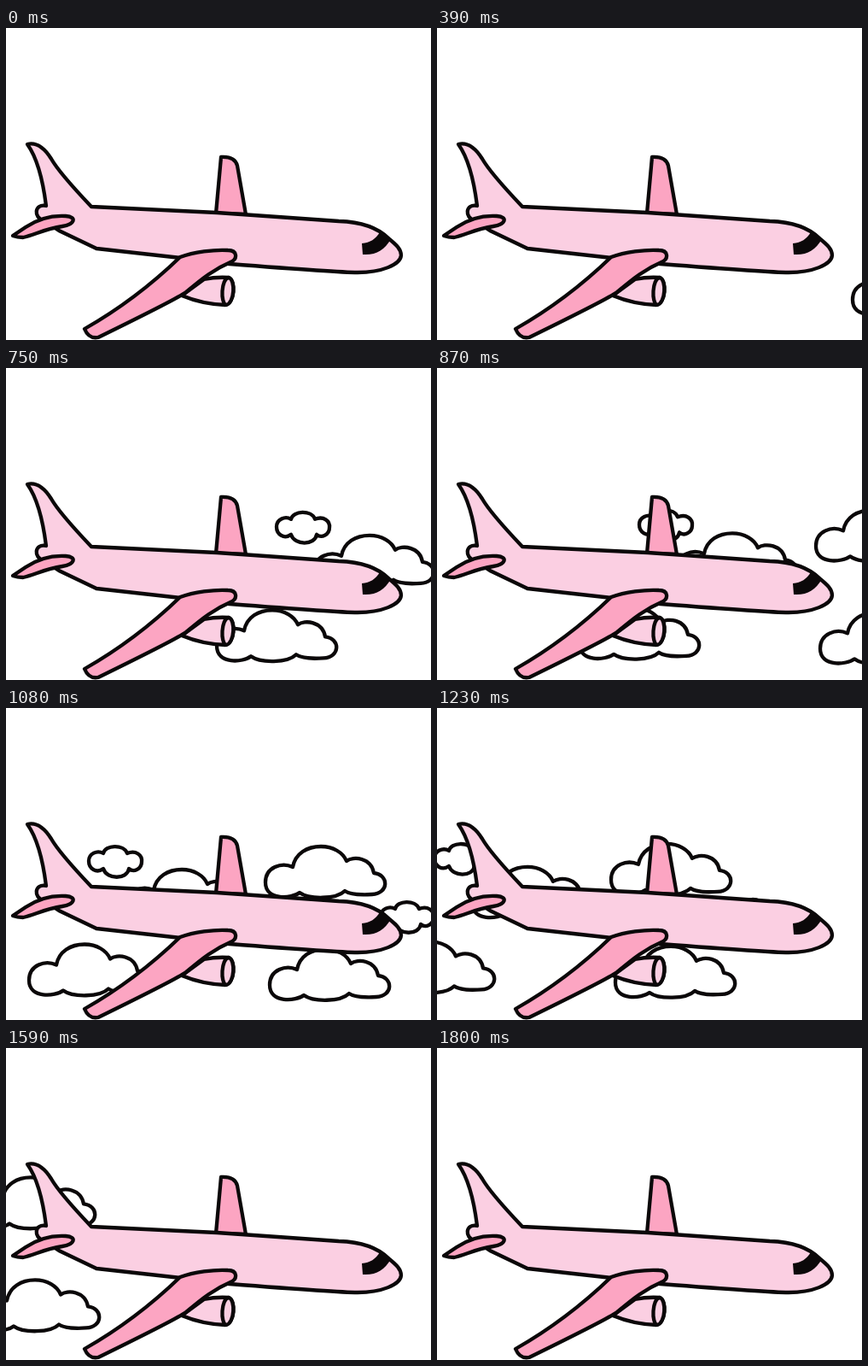
Recreate the animation shown at these times as an HTML page with a canvas. Size 498x365 px, loop 1830 ms.

```html
<!DOCTYPE html>
<html lang="en">
<head>
<meta charset="utf-8">
<title>Pink plane</title>
<style>
  html, body { margin: 0; width: 100%; height: 100%; overflow: hidden; background: #fff; }
  canvas { display: block; }
</style>
</head>
<body>
<canvas id="stage" width="498" height="365"></canvas>
<script>
const ctx = document.getElementById('stage').getContext('2d');
const LOOP = 1830, STEP = 30, LAST = 60;
const SPEED = 20, REST = 36, DRIFT = 0.62, TURN = 25;
const INK = '#0b0809', PALE = '#fbcfe2', ROSE = '#fca5c2', WHITE = '#fff';

const bigCloud = new Path2D('M33 26C36 10 50 2 66 2C80 2 92 9 96 19C104 13 125 15 128 33C146 35 146 57 126 58C114 59 100 58 94 54C84 64 52 64 41 56C32 63 1 66 1 44C1 26 20 20 33 26Z');
const smallCloud = new Path2D('M18 10C20 0 42-1 46 10C56 6 64 12 63 20C63 28 54 33 48 28C46 41 22 41 18 28C10 34 1 28 1 19C1 10 11 6 18 10Z');

// x and y hold where each cloud is at step REST.
const clouds = [
  { shape: smallCloud, x: 96, y: 160 },
  { shape: bigCloud, x: 140, y: 187 },
  { shape: bigCloud, x: 26, y: 274.5 },
  { shape: bigCloud, x: 303, y: 160 },
  { shape: bigCloud, x: 308, y: 280 },
  { shape: smallCloud, x: 438, y: 225 }
];

const plane = [
  // far wing, engine, engine mouth
  ['M252 151Q268 150 271 161L281 218L246 217Z', ROSE],
  ['M206 313L232 294Q246 291 261 292C270 296 268 322 257 324Q230 323 206 313Z', PALE],
  ['M261 292C269 294 268 322 258 324C251 322 252 293 261 292Z', PALE],
  // fuselage with fin and tail bump
  ['M25 136C37 133 46 142 53 153Q62 169 100 209L247 216L390 226C420 227 437 235 448 246C458 254 463 259 463 266C462 277 440 286 412 286Q390 286 262 276L205 269L106 258L62 237L44 225C32 222 33 205 47 208C44 184 38 154 25 136Z', PALE],
  // stabilizer, near wing
  ['M8 243L23 233C38 223 54 219 70 220C84 221 80 230 66 232C45 235 34 242 20 245Q13 245 8 243Z', ROSE],
  ['M92 352Q152 318 204 268C220 262 244 259 260 260C271 260 272 270 263 274C244 282 230 293 211 309Q202 316 108 362Q97 364 92 352Z', ROSE]
].map(([d, fill]) => [new Path2D(d), fill]);

const windscreen = new Path2D('M417 252C427 251 433 247 438 239Q447 240 451 247C443 260 434 266 418 265Z');

function paint(path, fill) {
  ctx.fillStyle = fill;
  ctx.fill(path);
  ctx.stroke(path);
}

// Clouds sink until TURN, then rise again.
function drawCloud({ shape, x, y }, step) {
  const rise = DRIFT * (Math.abs(step - TURN) - (REST - TURN));
  ctx.save();
  ctx.translate(x - SPEED * (step - REST), y - rise);
  paint(shape, WHITE);
  ctx.restore();
}

function draw(time) {
  const step = Math.floor((time % LOOP) / STEP);
  ctx.fillStyle = WHITE;
  ctx.fillRect(0, 0, 498, 365);
  ctx.strokeStyle = INK;
  ctx.lineWidth = 4.3;
  ctx.lineJoin = 'round';
  if (step < LAST) clouds.forEach(cloud => drawCloud(cloud, step));
  plane.forEach(([path, fill]) => paint(path, fill));
  ctx.fillStyle = INK;
  ctx.fill(windscreen);
}

function tick() {
  draw(performance.now());
  requestAnimationFrame(tick);
}
tick();
</script>
</body>
</html>
```
